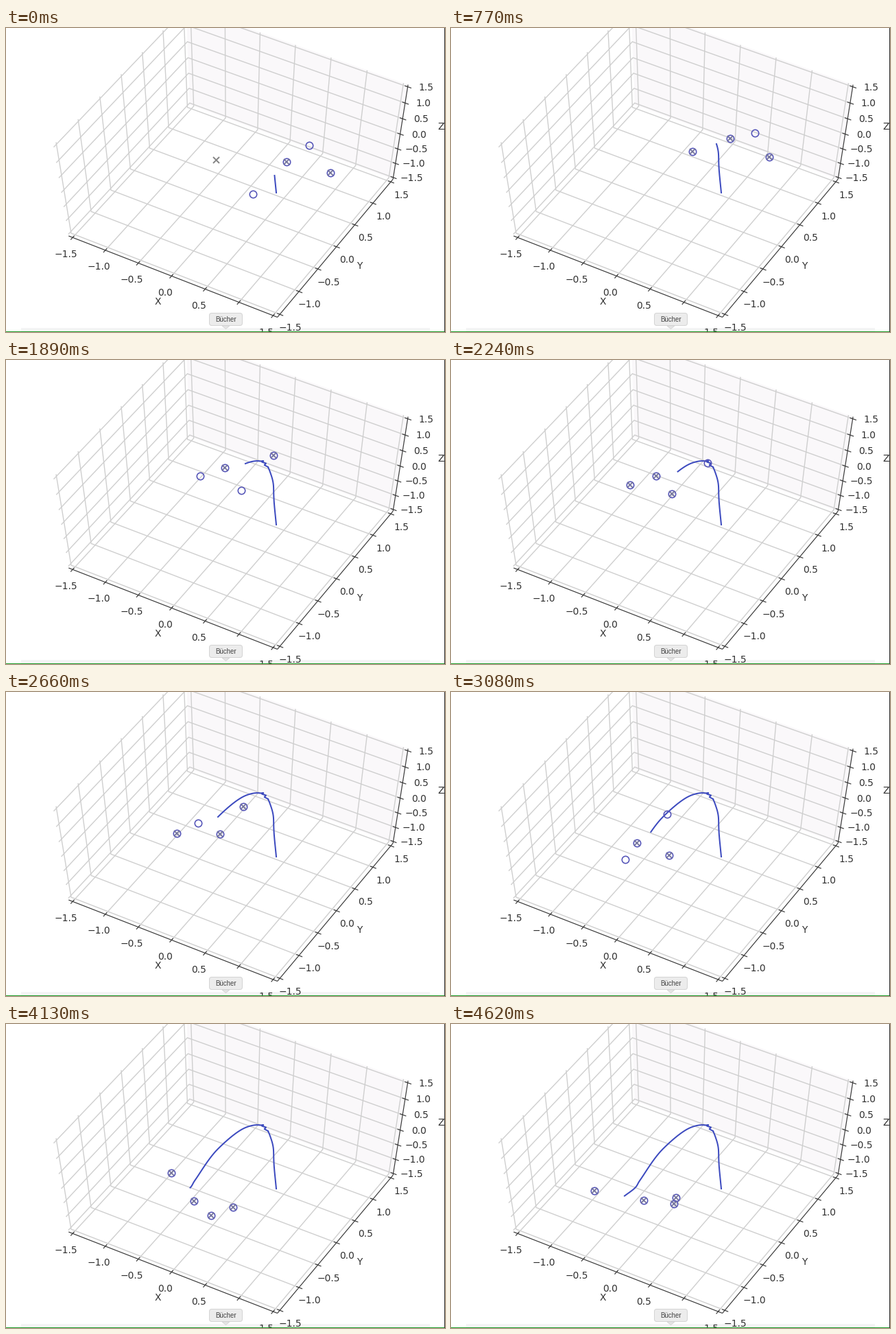
Recreate the animation shown at these times as a matplotlib script. Size 640 px wide and 443 px high, loop 4.69 s.

```python
import matplotlib.pyplot as plt
import numpy as np
from matplotlib.animation import FuncAnimation
from matplotlib.patches import FancyBboxPatch, Polygon, Rectangle

W, H, DPI = 640, 443, 64
FRAMES, STEP_MS = 67, 70
PT = 72 / DPI  # points per pixel
LIM = 1.5625   # box half-size, ticks end at 1.5
TICKS = np.linspace(-1.5, 1.5, 7)

GRID, AXIS, TEXT = "#cfcfcf", "#3a3a3a", "#303030"
BLUE, CROSS, CLUTTER = "#5454b8", "#74749c", "#868686"

# A few world points and where the camera puts them on the stage.
VIEW = {
    (-1.5, -LIM, -LIM): (97, 304), (0, -LIM, -LIM): (241, 362),
    (1.5, -LIM, -LIM): (390, 419), (LIM, 1.5, -LIM): (561, 224),
    (LIM, LIM, 1.5): (585, 86), (-LIM, -1.5, LIM): (73, 167),
    (-LIM, 0, LIM): (168, 68), (-0.5, LIM, LIM): (371, 5),
    (-1, LIM, -LIM): (320, 132),
}

# Key poses of the four moving targets.
POSES = {
    0: [(442, 171), (409, 195), (473, 211), (360, 242)],
    11: [(443, 153), (407, 161), (464, 188), (352, 180)],
    17: [(385, 143), (369, 157), (425, 185), (367, 168)],
    27: [(390, 139), (319, 157), (343, 190), (283, 169)],
    38: [(346, 167), (280, 191), (312, 207), (249, 206)],
    51: [(278, 191), (269, 250), (331, 271), (272, 283)],
    66: [(209, 243), (281, 257), (328, 253), (325, 262)],
}

# Key points of the estimated path.
PATH = {-3: (394, 240), 0: (391.5, 215), 11: (387, 169), 14: (382, 156),
        20: (371, 147.5), 27: (349, 151), 38: (309, 182), 51: (276, 227),
        60: (267, 240), 66: (253, 250.5)}

# Each target drops out for a short part of its own cycle.
PERIOD = np.array([10.8, 8, 10, 8.8])
START = np.array([0, 6, 7, 0])

STRAYS = {0: (306, 192), 46: (180, 183), 51: (278, 356)}
HELD = {47, 49}


def fit_camera():
    """Least-squares projection matrix for the known points."""
    rows, rhs = [], []
    for point, spot in VIEW.items():
        q = np.array([*point, 1.0])
        for i, value in enumerate(spot):
            row = np.zeros(11)
            row[4 * i:4 * i + 4] = q
            row[8:] = -value * q[:3]
            rows.append(row)
            rhs.append(value)
    sol = np.linalg.lstsq(np.array(rows), np.array(rhs), rcond=None)[0]
    return np.append(sol, 1).reshape(3, 4)


CAMERA = fit_camera()


def project(points):
    points = np.asarray(points, float)
    q = np.c_[points, np.ones(len(points))] @ CAMERA.T
    return q[:, :2] / q[:, 2:]


def smooth(poses, t):
    """Cubic Hermite curve through the key poses."""
    keys = np.array(list(poses), float)
    values = np.array(list(poses.values()), float)
    slopes = np.gradient(values, keys, axis=0)
    i = min(np.searchsorted(keys, t, side="right") - 1, len(keys) - 2)
    h = keys[i + 1] - keys[i]
    s = (t - keys[i]) / h
    return ((1 + 2 * s) * (1 - s) ** 2 * values[i] + s * (1 - s) ** 2 * h * slopes[i]
            + s * s * (3 - 2 * s) * values[i + 1] + s * s * (s - 1) * h * slopes[i + 1])


def path_point(t):
    spot = smooth(PATH, t)
    if 14 < t < 20:  # the estimate wavers at the top
        spot = spot + [-2 if t % 2 == 0 else 2, 18 - t]
    return spot


def detected(t):
    cycle = ((t - START) / PERIOD + 0.5) % 1 - 0.5
    return np.abs(cycle) > 0.09


fig = plt.figure(figsize=(W / DPI, H / DPI), dpi=DPI, facecolor="white")
ax = fig.add_axes([0, 0, 1, 1])
ax.set(xlim=(0, W), ylim=(H, 0))
ax.axis("off")


def line3d(points, color=GRID, width=1.4, z=1):
    xy = project(points)
    ax.plot(xy[:, 0], xy[:, 1], color=color, lw=width * PT, zorder=z,
            solid_capstyle="butt")


def label(x, y, text, px=13.9, color=TEXT, font="DejaVu Sans", z=5):
    ax.text(x, y, text, fontsize=px * PT, color=color, family=font,
            ha="center", va="center", zorder=z)


def draw_walls():
    wall = [(-LIM, LIM, -LIM), (LIM, LIM, -LIM), (LIM, LIM, LIM), (-LIM, LIM, LIM)]
    ax.add_patch(Polygon(project(wall), fc="#faf8fa", ec="none", zorder=0))
    for t in TICKS:
        line3d([(t, -LIM, -LIM), (t, LIM, -LIM), (t, LIM, LIM)])
        line3d([(LIM, t, -LIM), (-LIM, t, -LIM), (-LIM, t, LIM)])
        line3d([(-LIM, -LIM, t), (-LIM, LIM, t), (LIM, LIM, t)])


def draw_axis(name, place, tick, shift, name_shift):
    """place(t) is a point on the axis, tick the outward tick direction."""
    line3d([place(-LIM), place(LIM)], AXIS, 1.2, 2)
    tick = np.array(tick)
    for t in TICKS:
        line3d([place(t) - 0.04 * tick, place(t) + 0.05 * tick], AXIS, 1.2, 2)
        x, y = project([place(t)])[0] + shift
        label(x, y + 1, f"{t:.1f}".replace("-", "\u2212"))
    x, y = project([place(0)])[0] + name_shift
    label(x, y + 1, name)


def draw_dock():
    ax.add_patch(Rectangle((22, 436.5), W - 44, 7, fc="#f4f4f5", ec="none", zorder=0.5))
    ax.add_patch(Rectangle((0, 441.5), W, 1.5, fc="#1f9e2a", ec="none", zorder=9))
    ax.add_patch(Rectangle((W - 1, 0), 1, H, fc="#303030", ec="none", zorder=9))
    ax.add_patch(Polygon([(315, 434), (326, 434), (320.5, 438.5)],
                         fc="#e6e6e6", ec="#d4d4d4", lw=0.8 * PT, zorder=6))
    ax.add_patch(FancyBboxPatch((296.5, 415.5), 48, 18,
                                boxstyle="round,pad=0,rounding_size=3.5",
                                fc="#ececec", ec="#d4d4d4", lw=PT, zorder=7))
    label(320.5, 425, "Bücher", 9.8, "#444444", "Liberation Sans", 8)


draw_walls()
draw_axis("X", lambda t: np.array([t, -LIM, -LIM]), (0, -1, 0), (-9.5, 23.5), (-20, 37))
draw_axis("Y", lambda t: np.array([LIM, t, -LIM]), (1, 0, 0), (15.5, 18.5), (34, 27))
draw_axis("Z", lambda t: np.array([LIM, LIM, t]), (1, 0, 0), (27, 0), (59, -12))
draw_dock()

trail, = ax.plot([], [], color="#3c4abf", lw=2 * PT, zorder=10,
                 solid_joinstyle="round")
circles, = ax.plot([], [], "o", ms=10.4 * PT, mfc="none", mec=BLUE,
                   mew=1.6 * PT, zorder=11)
crosses, = ax.plot([], [], "x", ms=8.6 * PT, mec=CROSS, mew=1.8 * PT, zorder=12)
stray, = ax.plot([], [], "x", ms=9 * PT, mec=CLUTTER, mew=2 * PT, zorder=12)


def update(n):
    step = n - 1 if n in HELD else n
    spots = smooth(POSES, step)
    trail.set_data(*np.array([path_point(t) for t in range(-3, step + 1)]).T)
    circles.set_data(*spots.T)
    crosses.set_data(*spots[detected(step)].T)
    stray.set_data(*np.array([STRAYS.get(step, (np.nan, np.nan))]).T)
    return trail, circles, crosses, stray


anim = FuncAnimation(fig, update, frames=FRAMES, interval=STEP_MS,
                     repeat=True, repeat_delay=0, blit=False)
plt.show()
```
